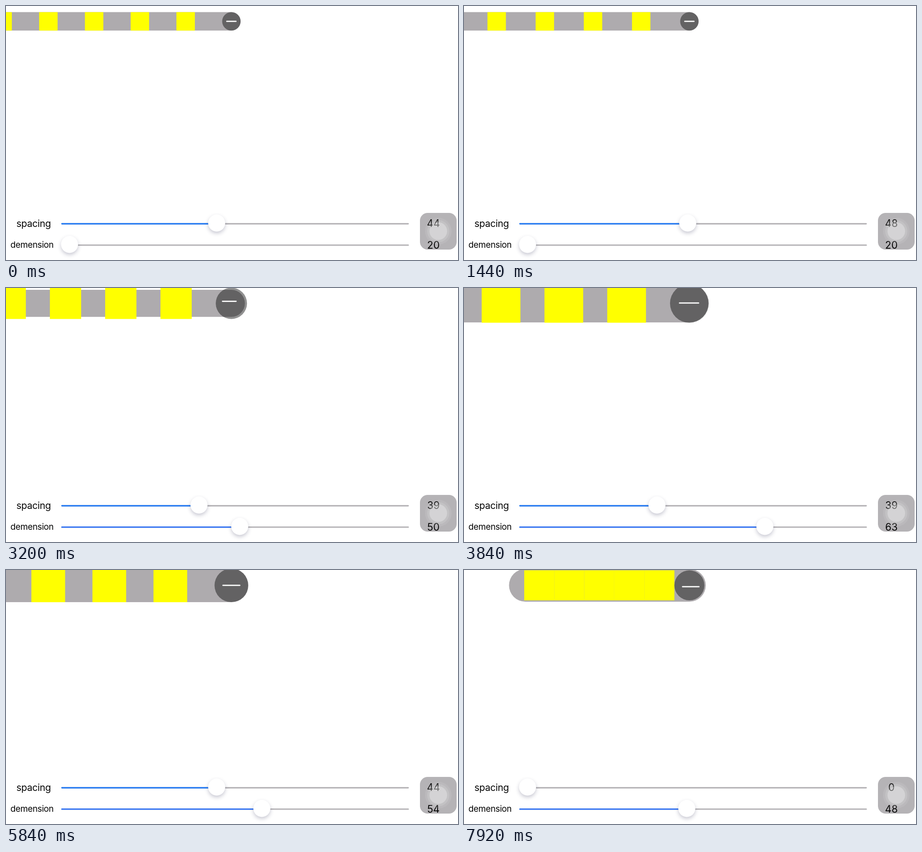
These frames come from a looping animation (998 by 561 pixels, 8000 ms). An HTML page with a canvas:

```html
<!DOCTYPE html>
<html lang="en">
<head>
<meta charset="utf-8">
<title>Menu spacing and dimension</title>
<style>
  html, body { margin: 0; width: 100%; height: 100%; overflow: hidden; background: #fff; }
  canvas { display: block; }
</style>
</head>
<body>
<canvas id="stage" width="998" height="561"></canvas>
<script>
const ctx = document.getElementById('stage').getContext('2d');
const LOOP = 8000, STEP = 80, LAG = 200;
const PT = 998 / 736;
const CX = 367 * PT, CY = 25 * PT;
const ITEMS = 5;
const FONT = 'Inter, "Liberation Sans", sans-serif';

// [time in ms, slider value]
const spacingKeys = [
  [0, 44.5], [1440, 48.45], [1960, 39.15], [5360, 39.15],
  [5840, 44.5], [6160, 44.5], [7080, 0]
];
const dimensionKeys = [
  [0, 20], [2080, 20], [2520, 35.4], [2720, 37.26], [3640, 62],
  [3840, 63.07], [4040, 63.6], [4520, 54.9], [7480, 54.9],
  [7720, 53.4], [7920, 48.9]
];

// Smooth curve through the keys, without overshoot
function slope(keys, i) {
  if (i < 1 || i >= keys.length - 1) return 0;
  const rate = j => (keys[j + 1][1] - keys[j][1]) / (keys[j + 1][0] - keys[j][0]);
  const a = rate(i - 1), b = rate(i);
  return a * b > 0 ? 2 * a * b / (a + b) : 0;
}

function sample(keys, t) {
  if (t <= keys[0][0]) return keys[0][1];
  const i = keys.findIndex(k => k[0] > t) - 1;
  if (i < 0) return keys[keys.length - 1][1];
  const [t0, v0] = keys[i], [t1, v1] = keys[i + 1];
  const h = t1 - t0, u = (t - t0) / h, w = 1 - u;
  return v0 * (1 + 2 * u) * w * w + v1 * u * u * (3 - 2 * u)
    + h * (slope(keys, i) * u * w * w - slope(keys, i + 1) * u * u * w);
}

function disc(x, y, r, color) {
  ctx.fillStyle = color;
  ctx.beginPath();
  ctx.arc(x, y, r, 0, Math.PI * 2);
  ctx.fill();
}

function pill(x, y, w, h, r, color) {
  ctx.fillStyle = color;
  ctx.beginPath();
  ctx.roundRect(x, y, w, h, r);
  ctx.fill();
}

function label(text, x, y, size, tracking) {
  ctx.font = `${size}px ${FONT}`;
  ctx.letterSpacing = tracking + 'px';
  ctx.textAlign = 'center';
  ctx.fillStyle = '#050505';
  ctx.fillText(text, x, y);
}

function slider(y, part, blue) {
  const x = 140.3 + 730 * part;
  pill(122, y - 1.4, 767.5, 2.8, 1.4, '#b0aeb1');
  pill(122, y - 1.4, x - 122, 2.8, 1.4, blue);
  ctx.save();
  ctx.shadowColor = 'rgba(40, 40, 80, 0.25)';
  ctx.shadowBlur = 9;
  ctx.shadowOffsetY = 4;
  disc(x, y - 1.6, 18.8, '#fff');
  ctx.restore();
}

function menu(t) {
  const size = at => Math.max(30, sample(dimensionKeys, at)) * PT;
  const gap = at => sample(spacingKeys, at) * PT;
  const d = size(t), pitch = d + gap(t);

  // The bar and the minus sign trail behind the buttons
  const late = size(t - LAG);
  const width = ITEMS * (late + gap(t - LAG)) + late;
  pill(CX + late / 2 - width, CY - late / 2, width, late, late / 2, '#aeabae');

  ctx.fillStyle = '#ff0';
  for (let i = 1; i <= ITEMS; i++) ctx.fillRect(CX - d / 2 - i * pitch, CY - d / 2, d, d);

  disc(CX, CY, d / 2, 'rgba(0, 0, 0, 0.43)');
  const shift = (late - d) / 2;
  ctx.strokeStyle = '#fff';
  ctx.lineWidth = 2.7;
  ctx.lineCap = 'round';
  ctx.beginPath();
  ctx.moveTo(CX + shift - late / 4, CY + shift);
  ctx.lineTo(CX + shift + late / 4, CY + shift);
  ctx.stroke();
}

function draw(t) {
  const spacing = sample(spacingKeys, t), dimension = sample(dimensionKeys, t);
  ctx.fillStyle = '#fff';
  ctx.fillRect(0, 0, 998, 561);
  menu(t);

  label('spacing', 61, 488, 21, -0.3);
  label('demension', 57.5, 534.3, 19, -0.4);
  slider(481, spacing / 100, '#1c78f8');
  slider(528.2, (dimension - 20) / 60, '#286ef8');

  pill(914, 457, 81, 81, 17, '#b5b3b6');
  label(Math.floor(spacing), 943.7, 488.3, 22.3, 0);
  label(Math.floor(dimension), 943.7, 535.8, 22.3, 0);
  disc(954.5, 497.3, 29.5, 'rgba(255, 255, 255, 0.08)');
  disc(954.5, 497.3, 24.5, 'rgba(255, 255, 255, 0.12)');
  disc(954.5, 497.3, 19.5, 'rgba(255, 255, 255, 0.28)');
}

const start = performance.now();
function tick() {
  const t = (performance.now() - start) % LOOP;
  draw(Math.floor(t / STEP) * STEP);
  requestAnimationFrame(tick);
}
tick();
</script>
</body>
</html>
```
